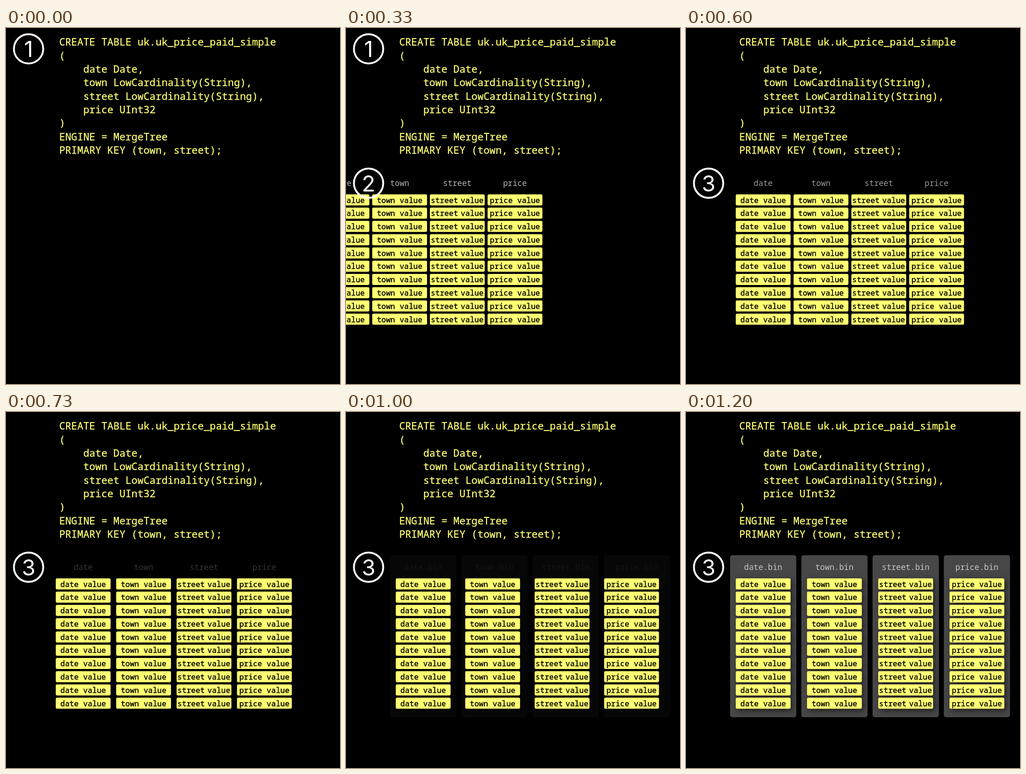
Write an HTML page with a canvas that moves like this. It is 725 px wide and 773 px high and loops after 2.46 s.

```html
<!DOCTYPE html>
<html lang="en">
<head>
<meta charset="utf-8">
<title>Table columns to files</title>
<style>
  html, body { margin: 0; width: 100%; height: 100%; overflow: hidden; background: #000; }
  canvas { display: block; }
</style>
</head>
<body>
<canvas id="stage" width="725" height="773"></canvas>
<script>
const ctx = document.getElementById('stage').getContext('2d');
const LOOP = 2460, FPS = 15;
const YELLOW = '#ffff72';
const MONO = '"Noto Sans Mono", "DejaVu Sans Mono", monospace';
const SANS = 'Inter, "Liberation Sans", sans-serif';

const CODE = [
  'CREATE TABLE uk.uk_price_paid_simple',
  '(',
  '    date Date,',
  '    town LowCardinality(String),',
  '    street LowCardinality(String),',
  '    price UInt32',
  ')',
  'ENGINE = MergeTree',
  'PRIMARY KEY (town, street);'
];
const COLS = ['date', 'town', 'street', 'price'];
const ROWS = 10, LEFT = 108, CELL_W = 119, CELL_H = 24, TOP = 361.3, ROW_STEP = 28.78;
const TIGHT = 125.2, WIDE = 154.65;

// Timeline in ms
const SLIDE = [133, 561], SPREAD = [564, 1135], NAMES_OUT = [564, 804], FILES_IN = [986, 1130];
const SLIDE_DIST = 623, STEP_TWO = 133, STEP_THREE = 599;

const part = (t, [a, b]) => Math.min(1, Math.max(0, (t - a) / (b - a)));
const easeOut = p => 1 - (1 - p) ** 2;
const easeInOut = p => (1 - Math.cos(Math.PI * p)) / 2;

// `bold` thickens the strokes by that many pixels
function text(str, x, y, size, color, { family = MONO, align = 'left', bold = 0 } = {}) {
  ctx.font = `${size}px ${family}`;
  ctx.textAlign = align;
  ctx.fillStyle = ctx.strokeStyle = color;
  ctx.fillText(str, x, y);
  if (bold) {
    ctx.lineWidth = bold;
    ctx.lineJoin = 'round';
    ctx.strokeText(str, x, y);
  }
}

function badge(n, y) {
  ctx.strokeStyle = '#fff';
  ctx.lineWidth = 4;
  ctx.beginPath();
  ctx.arc(49, y, 31.8, 0, Math.PI * 2);
  ctx.stroke();
  text(n, 49, y + 17.5, 48, '#fff', { family: SANS, align: 'center' });
}

function cellPath(x) {
  ctx.beginPath();
  for (let r = 0; r < ROWS; r++) ctx.roundRect(x, TOP + r * ROW_STEP, CELL_W, CELL_H, 3);
}

function column(name, x) {
  cellPath(x);
  ctx.fillStyle = YELLOW;
  ctx.fill();
  for (let r = 0; r < ROWS; r++) {
    const y = TOP + r * ROW_STEP + 18.2;
    const put = (s, px, align) => text(s, px, y, 16.5, '#000', { align, bold: 0.4 });
    if (name === 'street') {
      put(name, x + 1.8, 'left');
      put('value', x + 67, 'left');
    } else {
      put(name + ' value', x + CELL_W / 2, 'center');
    }
  }
}

function heading(str, x, color) {
  text(str, x + CELL_W / 2, 342.7, 17.25, color, { align: 'center' });
}

// File panels with the shadow of their settled cells, dimmed as one layer
function files(alpha) {
  COLS.forEach((name, i) => {
    const x = LEFT + i * WIDE;
    ctx.fillStyle = '#474747';
    ctx.beginPath();
    ctx.roundRect(x - 12.3, 311, 143.7, 351.7, 5);
    ctx.fill();
    ctx.save();
    ctx.clip();
    ctx.shadowColor = 'rgba(0,0,0,.6)';
    ctx.shadowBlur = 13;
    ctx.shadowOffsetX = ctx.shadowOffsetY = 4;
    cellPath(x);
    ctx.fill();
    ctx.restore();
    heading(name + '.bin', x, '#c6c6c6');
  });
  ctx.fillStyle = `rgba(0,0,0,${1 - alpha})`;
  ctx.fillRect(90, 305, 620, 365);
}

function draw(t) {
  ctx.fillStyle = '#000';
  ctx.fillRect(0, 0, 725, 773);
  CODE.forEach((line, i) => text(line, 115.4, 38.2 + i * 29.35, 21.8, YELLOW, { bold: 0.35 }));

  const shown = part(t, FILES_IN);
  if (shown > 0) files(shown);

  if (t >= STEP_TWO) {
    const x = LEFT - SLIDE_DIST * (1 - easeOut(part(t, SLIDE)));
    const step = TIGHT + (WIDE - TIGHT) * easeInOut(part(t, SPREAD));
    const names = 1 - part(t, NAMES_OUT);
    COLS.forEach((name, i) => {
      column(name, x + i * step);
      if (names > 0) heading(name, x + i * step, `rgba(178,178,178,${names})`);
    });
  }

  if (t < STEP_THREE) badge('1', 45.2);
  if (t >= STEP_TWO) badge(t < STEP_THREE ? '2' : '3', 337);
}

const start = performance.now();
function tick() {
  const t = (performance.now() - start) % LOOP;
  // Motion advances in whole steps; 7 ms covers the rounding of step times
  draw(Math.floor((t + 7) * FPS / 1000) * 1000 / FPS);
  requestAnimationFrame(tick);
}
tick();
</script>
</body>
</html>
```
